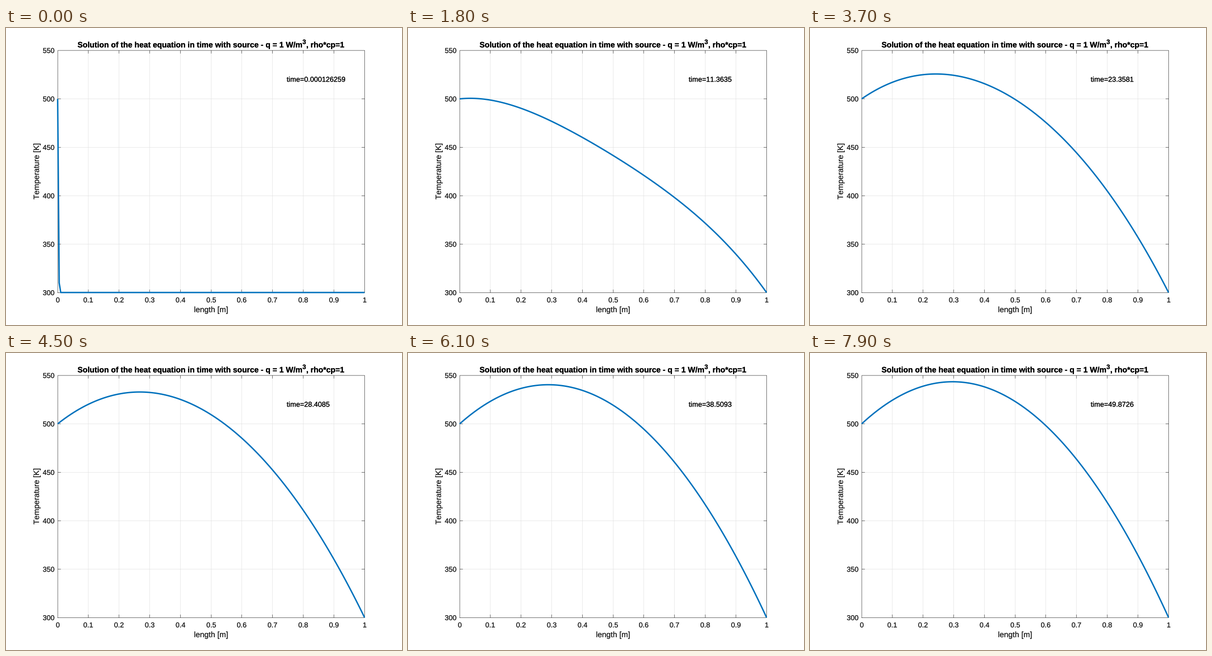
Recreate the animation shown at these times as a matplotlib script. Size 864 px wide and 648 px high, loop 8000 ms.

```python
import numpy as np
import matplotlib.pyplot as plt
from matplotlib.animation import FuncAnimation
from matplotlib.patheffects import withStroke

# A huge kerning factor switches kerning off.
plt.rcParams.update({"font.family": "Liberation Sans", "text.hinting": "none",
                     "text.kerning_factor": 20,
                     "path.snap": False, "path.simplify": False})

# At 72 dpi one point equals one pixel.
WIDTH, HEIGHT, DPI = 864, 648, 72
LEFT, BOTTOM = 0.13 * WIDTH, 0.89 * HEIGHT
PLOT_W, PLOT_H = 0.775 * WIDTH, 0.815 * HEIGHT
T_MIN, T_MAX = 300, 550
INK, GRID, BLUE = "#262626", "#dfdfdf", "#0072bd"

# The plot is laid out on a finer 1120 x 840 pixel grid.
CELL = WIDTH / 1120
SMALL, LARGE, BOLD = 20 * CELL, 22 * CELL, 17.1
TICK = 0.01 * PLOT_W

# Explicit heat equation scheme: fixed ends, constant source.
NODES, FRAMES, STEPS_PER_FRAME = 200, 80, 5000
DIFFUSIVITY, SOURCE = 0.01, 10
CELLS = NODES - 1
DT = 5 / CELLS**2
RATIO = DIFFUSIVITY * DT * CELLS**2

x = np.linspace(0, 1, NODES)
steady = 500 - 200 * x + SOURCE / (2 * DIFFUSIVITY) * x * (1 - x)
modes = np.arange(1, CELLS)
shapes = np.sin(np.pi * np.outer(x, modes))
growth = 1 - 4 * RATIO * np.sin(np.pi * modes / (2 * CELLS))**2
start = np.full(NODES, 300.0)
start[0] = 500
weights = 2 / CELLS * shapes.T @ (start - steady)


def temperature(step):
    return steady + shapes @ (weights * growth**step)


def to_x(value):
    return LEFT + PLOT_W * value


def to_y(value):
    return BOTTOM - PLOT_H * (value - T_MIN) / (T_MAX - T_MIN)


def on_grid(position):
    """Centre of the fine grid cell nearest to a position."""
    return (np.round(position / CELL) + 0.5) * CELL


fig = plt.figure(figsize=(WIDTH / DPI, HEIGHT / DPI), dpi=DPI, facecolor="white")
ax = fig.add_axes([0, 0, 1, 1])
ax.set_xlim(0, WIDTH)
ax.set_ylim(HEIGHT, 0)
ax.axis("off")


def rule(xs, ys, color, order):
    ax.plot(xs, ys, color=color, lw=CELL, zorder=order, solid_capstyle="butt")


def label(px, py, text, size=SMALL, color=INK, ha="left", **style):
    return ax.text(px, py, text, size=size, color=color, ha=ha, va="baseline",
                   path_effects=[withStroke(linewidth=0.25, foreground=color)],
                   **style)


x0, x1 = on_grid(to_x(0)), on_grid(to_x(1))
y0, y1 = on_grid(to_y(T_MIN)), on_grid(to_y(T_MAX))

for tenth in range(11):
    px = on_grid(to_x(tenth / 10))
    if 0 < tenth < 10:
        rule([px, px], [y0, y1], GRID, 1)
        rule([px, px], [y0, y0 - TICK], INK, 2)
        rule([px, px], [y1, y1 + TICK], INK, 2)
    label(px, 598.6, f"{tenth / 10:g}", ha="center")

for kelvin in range(T_MIN, T_MAX + 1, 50):
    py = on_grid(to_y(kelvin))
    if T_MIN < kelvin < T_MAX:
        rule([x0, x1], [py, py], GRID, 1)
        rule([x0, x0 + TICK], [py, py], INK, 2)
        rule([x1, x1 - TICK], [py, py], INK, 2)
    label(105.8, py + 5.5, str(kelvin), ha="right")

ax.plot([x0, x1, x1, x0, x0], [y0, y0, y1, y1, y0], color=INK, lw=CELL,
        zorder=2, solid_joinstyle="miter", solid_capstyle="projecting")

label(447.4, 620, "length [m]", LARGE, ha="center")
label(72, 312.6, "Temperature [K]", LARGE, ha="center",
      rotation=90, rotation_mode="anchor")
label(156, 42.3, "Solution of the heat equation in time with source - q = 1 W/m",
      BOLD, "black", weight="bold")
label(646.8, 35, "3", 14, "black", weight="bold")
label(655, 42.3, ", rho*cp=1", BOLD, "black", weight="bold")

clock = label(612.4, 117.2, "", color="black")
curve, = ax.plot([], [], color=BLUE, lw=4 * CELL, zorder=3,
                 solid_joinstyle="round", solid_capstyle="butt")


def update(frame):
    step = 1 + STEPS_PER_FRAME * frame
    half = CELL / 2
    curve.set_data(to_x(x) + half, to_y(temperature(step)) + half)
    clock.set_text(f"time={step * DT:.6g}")
    return curve, clock


animation = FuncAnimation(fig, update, frames=FRAMES, interval=100,
                          repeat=True, repeat_delay=0)
plt.show()
```
